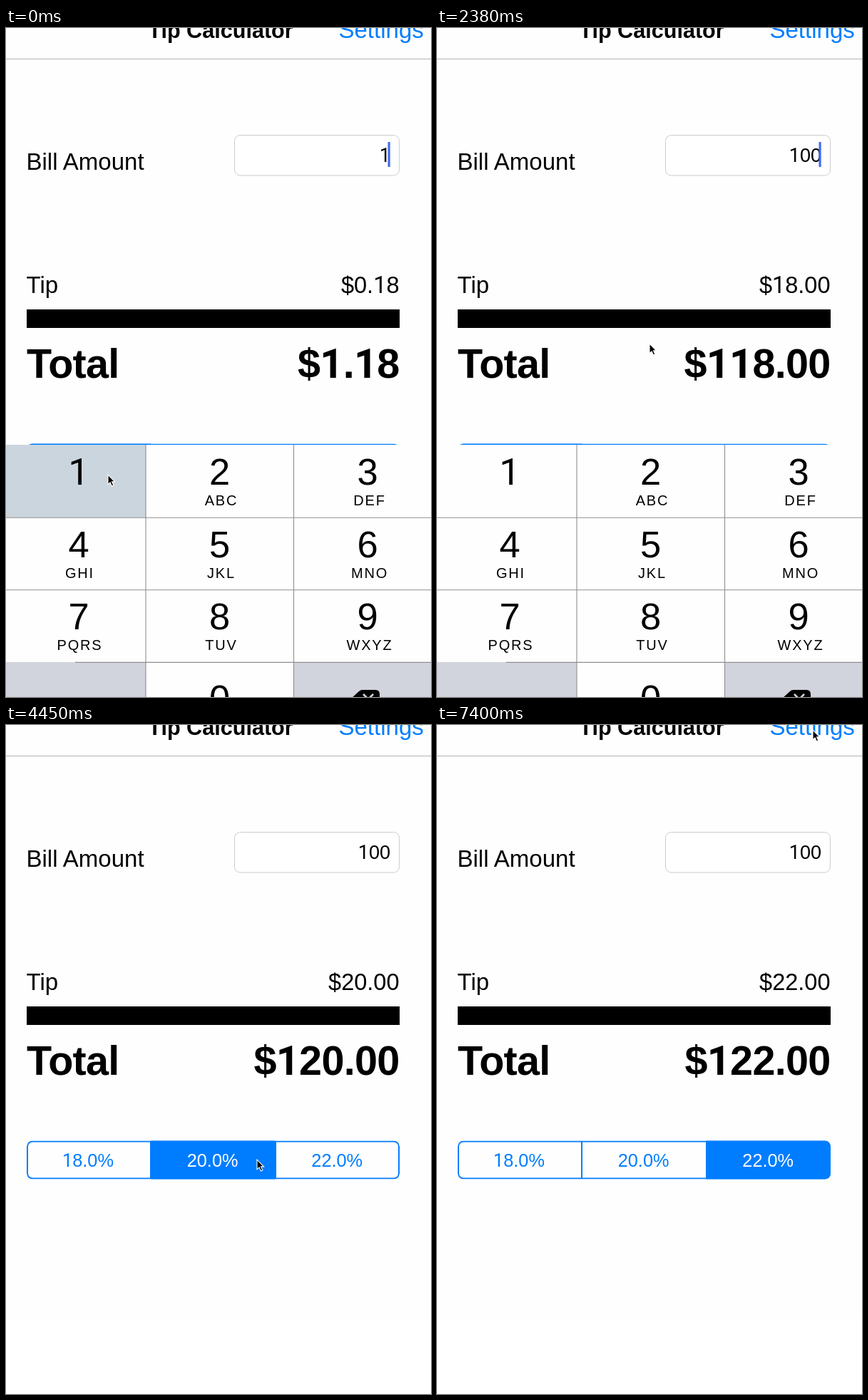
Animation, 596 px wide and 939 px high, one loop 8000 ms. Source, as an HTML page:

```html
<!DOCTYPE html>
<html lang="en">
<head>
<meta charset="utf-8">
<title>Tip Calculator</title>
<style>
html, body { margin: 0; width: 100%; height: 100%; overflow: hidden; background: #fff; }
svg { display: block; width: 596px; height: 939px; }
text { font-family: "Liberation Sans", Arial, sans-serif; font-size: 33px; fill: #000; white-space: pre; }
.one { font-family: Roboto, "Liberation Sans", sans-serif; }
.num { font-kerning: none; }
.end { text-anchor: end; }
.mid { text-anchor: middle; }
.bold { font-weight: 700; }
.title { font-size: 30.6px; }
.amount { font-size: 32.5px; }
.big { font-size: 57.5px; letter-spacing: -.7px; }
.field { font-size: 27px; }
.digit { font-size: 52.5px; }
.abc { font-size: 20px; letter-spacing: 1.8px; }
.seg { font-size: 25.3px; }
</style>
</head>
<body>
<svg id="stage" viewBox="0 0 596 939" xmlns="http://www.w3.org/2000/svg">
  <defs>
    <clipPath id="round"><rect x="29" y="583.5" width="523" height="54" rx="8"/></clipPath>
  </defs>
  <rect width="596" height="939" fill="#fff"/>
  <rect width="596" height="832" fill="#fefefe"/>

  <text class="bold mid title" x="301" y="14">Tip Calculator</text>
  <text x="466.5" y="14" style="fill:#007dff">Settings</text>
  <rect y="43" width="596" height="1" fill="#b4b4b4"/>

  <text x="28.5" y="199">Bill Amount</text>
  <rect x="320.5" y="150.5" width="231" height="56.5" rx="8" fill="#fff" stroke="#ccc"/>
  <text id="bill" class="num field end" x="539" y="187.5"></text>
  <rect id="caret" x="535.5" y="160" width="3.2" height="35" fill="#426bf2"/>

  <text x="28.5" y="372">Tip</text>
  <text id="tip" class="num amount end" x="551.5" y="372"></text>
  <rect x="29" y="395" width="523" height="26" fill="#000"/>
  <text class="bold big" x="29" y="490.5">Total</text>
  <text id="total" class="num bold big end" x="551.5" y="490.5"></text>

  <g id="segments" clip-path="url(#round)"></g>
  <g id="keyboard"></g>
  <path id="cursor" d="M0 0V13.6L3.1 10.8L5.4 16L7.8 15L5.6 9.9H9.6Z" fill="#000" stroke="#fff" stroke-width="1.1"/>
</svg>
<script>
const LOOP = 8000, TICK = 148;
const BLUE = '#007dff', WHITE = '#fefefe', GREY = '#d1d4dc', LINE = '#8e8e8e';
const $ = id => document.getElementById(id);

function add(parent, tag, attrs, text = '') {
  const el = document.createElementNS('http://www.w3.org/2000/svg', tag);
  for (const k in attrs) el.setAttribute(k, attrs[k]);
  write(el, text);
  return parent.appendChild(el);
}

// The digit 1 is set in a face whose 1 has no foot.
function write(el, text) {
  if (el.dataset.text === text) return;
  el.dataset.text = text;
  el.innerHTML = text.replace(/1/g, '<tspan class="one">1</tspan>');
}

const show = (el, on) => el.setAttribute('visibility', on ? 'visible' : 'hidden');

// Segmented control
const segs = [18, 20, 22].map((rate, i) => {
  const x = 29 + i * 174.3;
  const box = add($('segments'), 'rect', { x, y: 583, width: 174.5, height: 55 });
  const label = add($('segments'), 'text',
    { class: 'num seg mid', x: 115 + i * 174.6, y: 619.5 }, rate.toFixed(1) + '%');
  return { box, label };
});
for (const x of [202, 377])
  add($('segments'), 'rect', { x, y: 584, width: 2, height: 53, fill: BLUE });
add($('segments'), 'rect', { x: 30, y: 584.5, width: 521, height: 52, rx: 7,
  fill: 'none', stroke: BLUE, 'stroke-width': 2 });

// Number pad
const board = $('keyboard');
const cols = [0, 196, 403.5, 596], rows = [585, 687, 789, 890, 1000];
const letters = ['', 'ABC', 'DEF', 'GHI', 'JKL', 'MNO', 'PQRS', 'TUV', 'WXYZ'];
const keys = {};

function key(name, col, row, fill) {
  keys[name] = add(board, 'rect', { x: cols[col], y: rows[row],
    width: cols[col + 1] - cols[col], height: rows[row + 1] - rows[row], fill });
}
letters.forEach((abc, i) => {
  const col = i % 3, row = Math.floor(i / 3);
  key(i + 1, col, row, WHITE);
  add(board, 'text', { class: 'digit mid', x: [102, 299.5, 507][col], y: 641 + row * 101.6 }, String(i + 1));
  add(board, 'text', { class: 'abc mid', x: [103.5, 302, 510][col], y: 670 + row * 101.6 }, abc);
});
key('blank', 0, 3, GREY);
key(0, 1, 3, WHITE);
key('back', 2, 3, GREY);
add(board, 'text', { class: 'digit mid', x: 299.5, y: 958.5 }, '0');
add(board, 'path', { d: 'M483 942L495 931Q497 929 500 929H518Q524 929 524 935V956H497Z', fill: '#000' });
add(board, 'path', { d: 'M501 935L515 949M515 935L501 949', stroke: GREY, 'stroke-width': 2.6 });
add(board, 'path', { d: 'M196 585V1000M403.5 585V1000M0 687.2H596M0 788.8H596M97 890.4H596',
  stroke: LINE, 'stroke-width': 1.1 });

// Pointer stops: tick, x, y
const stops = [
  [0, 143, 627], [2, 279, 917], [9, 279, 917], [16, 298, 443], [19, 298, 443],
  [24, 416, 603], [28, 352, 610], [31, 352, 610], [37, 440, 608], [43, 440, 608], [50, 527, 7]
];
const ease = u => .7 * u + .3 * u * u * (3 - 2 * u);

function pointer(n) {
  const i = stops.findIndex(s => s[0] > n);
  if (i < 0) return stops[stops.length - 1].slice(1);
  const [n0, x0, y0] = stops[i - 1], [n1, x1, y1] = stops[i];
  const u = ease((n - n0) / (n1 - n0));
  return [x0 + (x1 - x0) * u, y0 + (y1 - y0) * u];
}

function draw(t) {
  const n = Math.floor(t / TICK);
  const within = (a, b) => n >= a && n < b;

  const bill = n < 6 ? 1 : n < 9 ? 10 : 100;
  const sel = n < 30 ? 0 : n < 40 ? 1 : 2;
  const touched = n === 29 ? 1 : within(38, 40) ? 2 : -1;
  const tip = bill * (18 + 2 * sel) / 100;
  write($('bill'), String(bill));
  write($('tip'), '$' + tip.toFixed(2));
  write($('total'), '$' + (bill + tip).toFixed(2));
  show($('caret'), n < 18 && !within(12, 15));

  segs.forEach(({ box, label }, i) => {
    box.setAttribute('fill', i === sel ? BLUE : i === touched ? '#d9ecff' : WHITE);
    label.style.fill = i === sel ? '#fff' : BLUE;
  });

  keys[1].setAttribute('fill', n < 1 ? '#cad5de' : WHITE);
  keys[0].setAttribute('fill', within(4, 6) || within(7, 9) ? GREY : WHITE);
  const drop = n < 18 ? 0 : n === 18 ? 70 : 290;
  board.setAttribute('transform', `translate(0 ${drop})`);
  show(board, n < 20);

  const [x, y] = pointer(n);
  $('cursor').setAttribute('transform', `translate(${x.toFixed(1)} ${y.toFixed(1)})`);
}

const start = performance.now();
function frame() {
  draw((performance.now() - start) % LOOP);
  requestAnimationFrame(frame);
}
frame();
</script>
</body>
</html>
```
